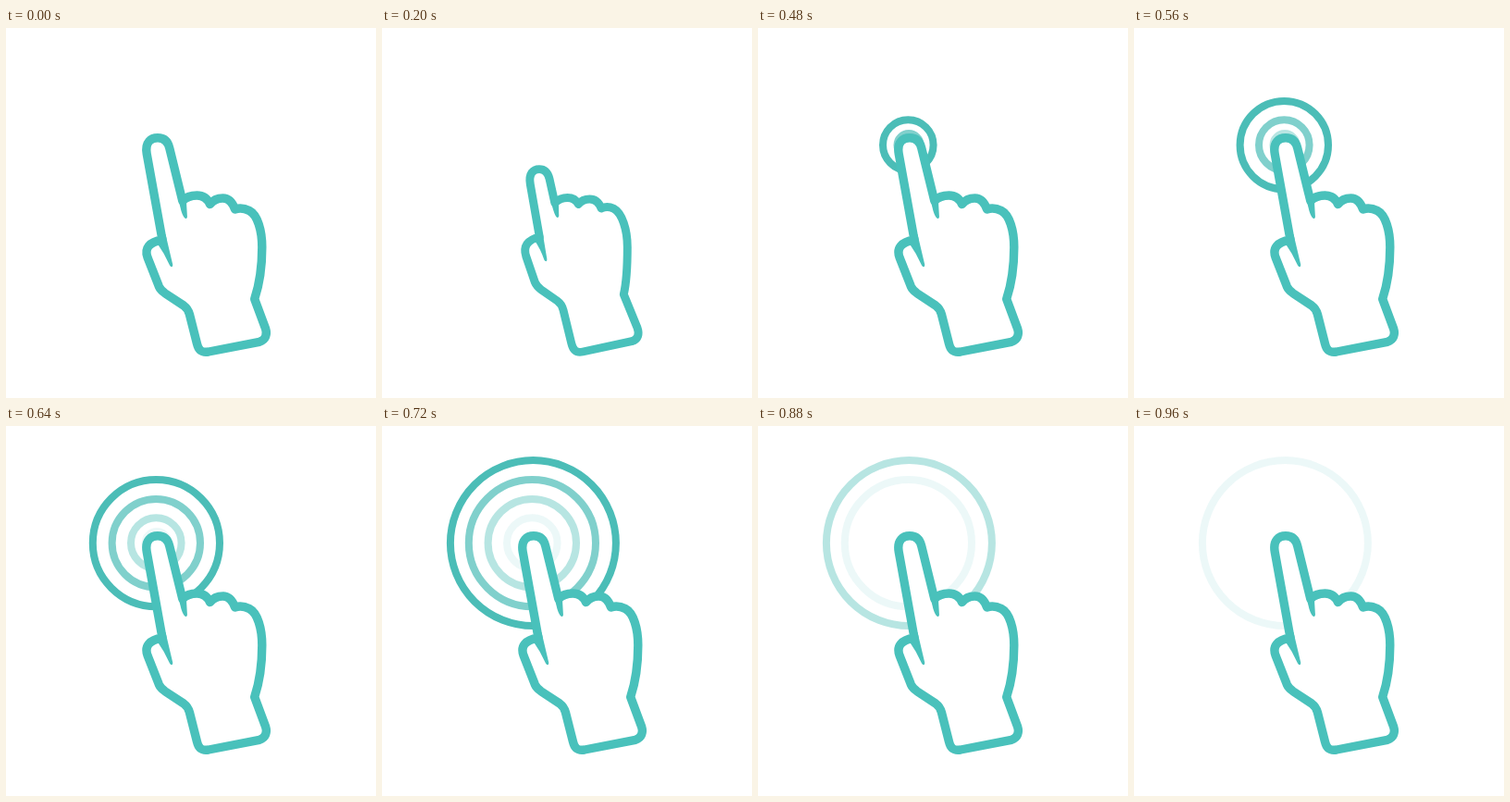
Write an HTML page that moves like this. It is 400 px wide and 400 px high and loops after 1040 ms.

```html
<!DOCTYPE html>
<html lang="en">
<head>
<meta charset="utf-8">
<title>Tap</title>
<style>
  html, body { margin: 0; width: 100%; height: 100%; overflow: hidden; background: #fff; }
  svg { display: block; width: 100vw; height: 100vh; }
  .outline { fill: #fff; stroke: #49c1bb; stroke-width: 9.4; stroke-linejoin: round; }
  #pressed .outline { stroke-width: 8.9; }
  .crease { fill: #49c1bb; }
</style>
</head>
<body>
<svg viewBox="0 0 400 400">
  <g id="rings" fill="none" stroke="#4bbdb7" stroke-width="8"></g>
  <g id="raised">
    <path class="outline" d="M169 229 L152.2 136 C150 123 157 118.7 164 118.7 C170.5 118.7 175 122 176.8 130
      L190.8 187 C195 182.5 201 181 206.5 181 C213 181 218 185 220.5 190.5 C224 186 229 184 234.5 184
      C241 184 245 189 247.5 196 C252 194.5 258 195 263 197.5 C272 202 276.8 219 276.8 237
      C276.8 257 274 277 268.7 293 L280.6 325 C282.5 331 281 337 274 339.3 L219 350 C211 351.3 208 348 206.4 341
      L198.4 309.5 C197 304.5 195.5 302.5 192 300 L172 286.8 C168.5 284.3 166.8 282.8 165.3 279.3 L153 248
      C149.5 238 154.5 231.5 169 229 Z"/>
    <path class="crease" d="M163 232 Q171.5 244 177.2 257 Q180 260 180.3 256 L172.5 223 Z
      M186 184 L189.5 198 Q191.5 204.5 194 206 Q196.5 206.5 195.8 202 L195 188 Z"/>
  </g>
  <g id="pressed">
    <path class="outline" d="M170.3 226 L160.3 169 C158.3 157 163.5 152.6 170 152.6 C176 152.6 179.3 156 181 163
      L186.8 189 C191 185 196 183.5 200.5 183.5 C206.5 183.5 210 186 212.3 190.5 C215.5 186.5 220 185 224.5 185
      C231 185 234.5 188.5 237 195 C241 193 246 193 250.5 195.3 C259.5 200 265.3 218 265.3 237
      C265.3 257 265 272 261.3 288 L276 324 C278.5 331 277 336.5 270 338.7 L217 350 C209.5 351.5 206.5 348 204.8 341
      L196 305 C194.8 300 193 297.5 189.5 295 L172 282.8 C168.5 280.3 166.8 278.3 165.3 274.8 L155.8 247
      C152.3 236 157 229 170.3 226 Z"/>
    <path class="crease" d="M164.5 229 Q171.5 239 175.5 251 Q178.3 254 178.4 250 L173.6 221 Z
      M182.2 187 L185.6 198 Q187.5 204 189.5 205 Q191.7 205 191.2 201 L191 189 Z"/>
  </g>
</svg>
<script>
  const LOOP = 1040, PRESS = 200, RELEASE = 400, STEP = 80, FADE = 0.3;
  const byId = id => document.getElementById(id);
  const raised = byId("raised"), pressed = byId("pressed");

  // Centre x and radius of each ring, from the inside out.
  const sizes = [[163, 12.5], [162.3, 27.3], [162.3, 47.7], [162.4, 68.6], [163.4, 89.5]];
  const rings = sizes.map(([cx, r]) => {
    const ring = document.createElementNS("http://www.w3.org/2000/svg", "circle");
    ring.setAttribute("cx", cx);
    ring.setAttribute("cy", 126.6);
    ring.setAttribute("r", r);
    byId("rings").appendChild(ring);
    return ring;
  });

  function draw(time) {
    const t = time % LOOP;
    const down = t >= PRESS && t < RELEASE;
    raised.style.display = down ? "none" : "";
    pressed.style.display = down ? "" : "none";

    // Each step starts one wider ring and fades the earlier ones.
    const step = Math.floor((t - RELEASE) / STEP);
    rings.forEach((ring, i) => {
      const age = step - i;
      ring.setAttribute("opacity", age < 0 ? 0 : Math.max(0, 1 - FADE * age));
    });
  }

  const start = performance.now();
  function tick() {
    draw(performance.now() - start);
    requestAnimationFrame(tick);
  }
  tick();
</script>
</body>
</html>
```
